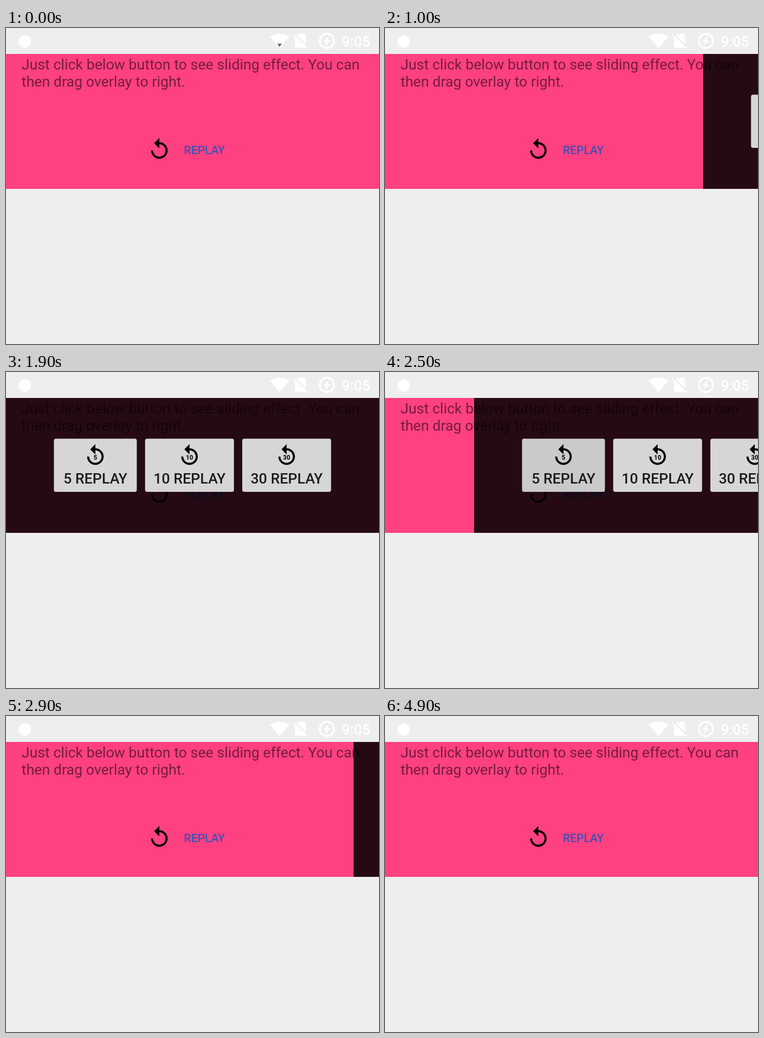
Recreate the animation shown at these times as an HTML page. Size 720 px wide and 609 px high, loop 5000 ms.

```html
<!DOCTYPE html>
<html lang="en">
<head>
<meta charset="utf-8">
<title>Sliding overlay</title>
<style>
  html, body { margin: 0; width: 100%; height: 100%; overflow: hidden; background: #eee; }
  svg { display: block; width: 100%; height: 100%; font-family: Roboto, sans-serif; }
</style>
</head>
<body>
<svg viewBox="0 0 720 609">
  <defs>
    <path id="replay" transform="scale(2)" d="M12 5V1L7 6l5 5V7c3.31 0 6 2.69 6 6s-2.69 6-6 6-6-2.69-6-6H4c0 4.42 3.58 8 8 8s8-3.58 8-8-3.58-8-8-8z"/>
  </defs>
  <rect width="720" height="609" fill="#eee"/>

  <g id="status" fill="#fff">
    <circle cx="36" cy="26" r="12"/>
    <path d="M528 39L509 16.5Q528 5.5 547 16.5Z"/>
    <path id="traffic" d="M523.5 30h9l-4.5 7z" fill="#777"/>
    <path transform="translate(550.4 6.5) scale(1.5)" d="M18.99 5c0-1.1-.89-2-1.99-2h-7L7.66 5.34 19 16.68zM3.65 3.88L2.38 5.15 5 7.77V19c0 1.1.9 2 2 2h10.01c.35 0 .67-.1.96-.26l1.88 1.88 1.27-1.27z"/>
    <circle cx="619.5" cy="25" r="13.7" fill="none" stroke="#fff" stroke-width="3.6"/>
    <path d="M623 16L612.5 26.5H618L616 34.5L626.5 24H621Z"/>
    <text x="648" y="36" font-size="28" font-weight="500">9:05</text>
  </g>

  <g id="card">
    <rect y="50" width="720" height="260" fill="#ff4081"/>
    <g font-size="28" fill="#000" fill-opacity=".54">
      <text x="30" y="80">Just click below button to see sliding effect. You can</text>
      <text x="30" y="113">then drag overlay to right.</text>
    </g>
    <use href="#replay" x="272" y="210"/>
    <text x="343.5" y="243" font-size="22" font-weight="500" fill="#3f51b5">REPLAY</text>
  </g>

  <g id="overlay">
    <rect y="50" width="720" height="260" fill-opacity=".85"/>
  </g>
</svg>
<script>
const LOOP = 5000, STEP = 100, WIDTH = 720;
const byId = id => document.getElementById(id);
const overlay = byId('overlay'), traffic = byId('traffic');

function addButton(x, width, count) {
  const mid = x + width / 2;
  overlay.insertAdjacentHTML('beforeend', `
    <g text-anchor="middle">
      <rect class="face" x="${x}" y="128.5" width="${width}" height="102.5" rx="4" fill="#d6d6d6"/>
      <use href="#replay" x="${mid - 24}" y="137"/>
      <text x="${mid}" y="168.5" font-size="12" font-weight="700">${count}</text>
      <text x="${mid}" y="215" font-size="28" font-weight="500" fill="#1c1c1c">${count} REPLAY</text>
    </g>`);
}
addButton(92.5, 160, 5);
addButton(268.5, 171.5, 10);
addButton(456, 171.5, 30);
const firstFace = overlay.querySelector('.face');

// Accelerate, then decelerate
function ease(t, start, duration) {
  const u = Math.min(1, Math.max(0, (t - start) / duration));
  return (1 - Math.cos(Math.PI * u)) / 2;
}

function offset(t) {
  if (t < 2400) return WIDTH * (1 - ease(t, 749, 1000));
  if (t < 3000) return WIDTH * ease(t, 2243, 790);
  return WIDTH;
}

function draw(t) {
  const x = Math.round(offset(t));
  overlay.setAttribute('transform', `translate(${x} 0)`);
  overlay.setAttribute('visibility', x < WIDTH ? 'visible' : 'hidden');
  firstFace.setAttribute('fill', t >= 2400 && t < 3000 ? '#cacaca' : '#d6d6d6');
  const busy = t < 800 || (t >= 3000 && t < 4000);
  traffic.setAttribute('visibility', busy ? 'visible' : 'hidden');
}

// The screen refreshes ten times a second
const begin = performance.now();
function tick() {
  const t = (performance.now() - begin) % LOOP;
  draw(Math.floor(t / STEP) * STEP);
  requestAnimationFrame(tick);
}
tick();
</script>
</body>
</html>
```
